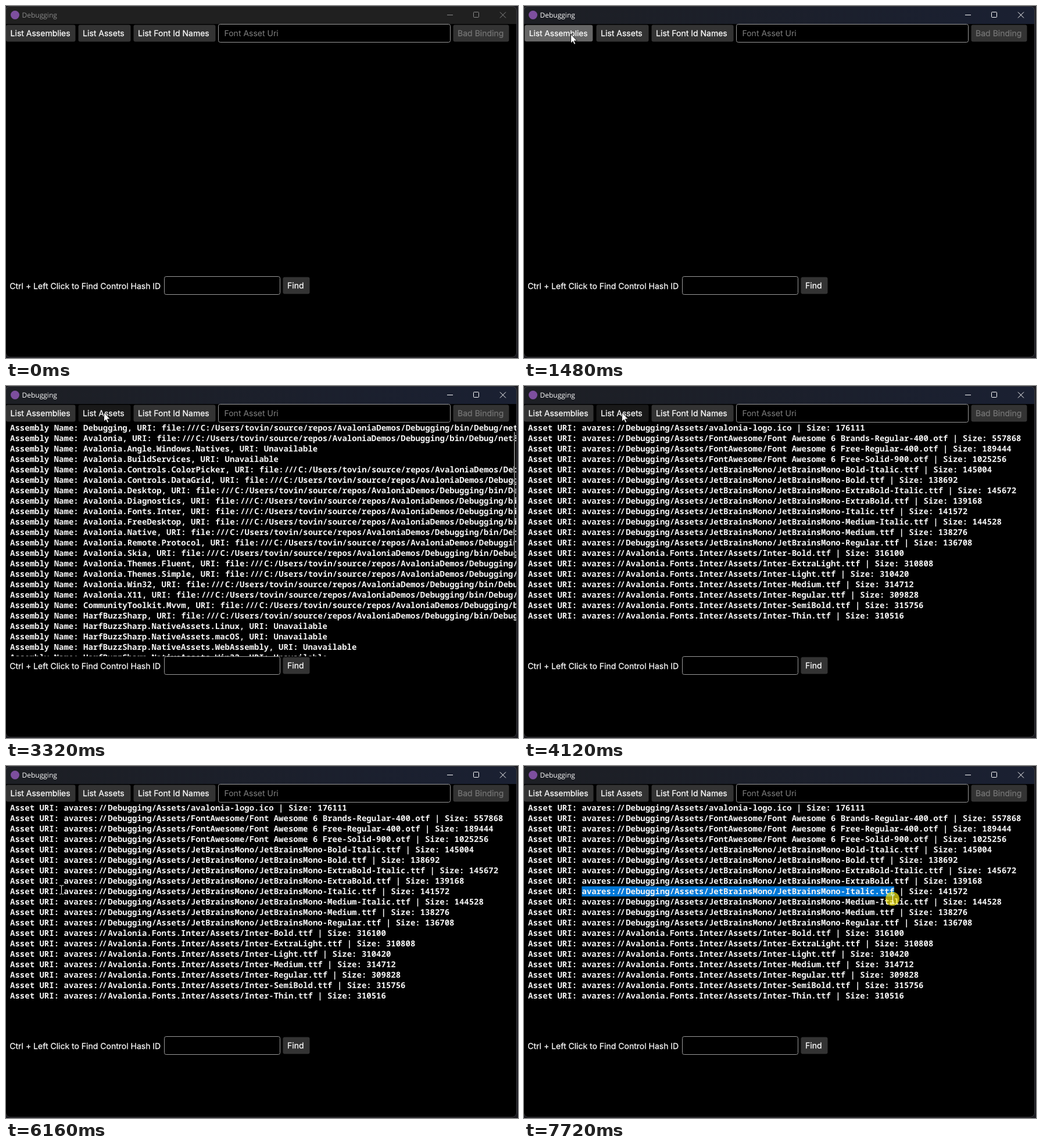
An HTML page that plays this animation: 881x607 px, repeating every 8 s.

```html
<!DOCTYPE html>
<html lang="en">
<head>
<meta charset="utf-8">
<title>Debugging</title>
<style>
  html, body { margin: 0; width: 100%; height: 100%; overflow: hidden; background: #1c1c22; }
  svg { display: block; width: 881px; height: 607px; }
  text { text-rendering: geometricPrecision; }
  .ui { font: 400 14px Inter, sans-serif; fill: #fff; stroke: #fff; stroke-width: .25px; }
  .dim { fill: #747474; stroke: #747474; }
  .hint { fill: #808080; stroke: none; }
  .title { font: 400 12px "Open Sans", "Noto Sans", sans-serif; }
  .mono { font: 600 14px "Noto Sans Mono", "DejaVu Sans Mono", monospace; fill: #f4f4f4; }
  .box { fill: #000; stroke: #9a9a9a; }
</style>
</head>
<body>
<svg id="stage" viewBox="0 0 881 607" xmlns="http://www.w3.org/2000/svg"></svg>
<script>
const LOOP = 8000;
const NS = "http://www.w3.org/2000/svg";
const COL = 8.4, LEFT = 7, ROW = 18, BASE = 77;
const stage = document.getElementById("stage");

function el(tag, attrs, parent = stage, text) {
  const node = document.createElementNS(NS, tag);
  for (const key in attrs) node.setAttribute(key, attrs[key]);
  if (text !== undefined) node.textContent = text;
  parent.appendChild(node);
  return node;
}
const show = (node, on) => node.setAttribute("visibility", on ? "visible" : "hidden");
const clamp = v => Math.max(0, Math.min(1, v));
const smooth = p => p * p * (3 - 2 * p);
const mix = (a, b, p) => "rgb(" + a.map((v, i) => Math.round(v + (b[i] - v) * p)) + ")";

// Pulls runs of slashes together, as a coding ligature does.
function ligature(text) {
  const dx = [];
  const run = text.match(/\/\/+/);
  if (!run) return "0";
  const first = run.index, n = run[0].length;
  for (let i = 0; i <= first + n; i++) dx[i] = 0;
  dx[first] = 1.2;
  for (let i = 1; i < n; i++) dx[first + i] = -2.4 / (n - 1);
  dx[first + n] = 1.2;
  return dx.join(" ");
}

// Window frame
const defs = el("defs", {});
const grad = el("linearGradient", { id: "bar" }, defs);
const stops = [0, 1].map(offset => el("stop", { offset }, grad));
const winClip = el("clipPath", { id: "win" }, defs);
el("rect", { x: -1, y: 0, width: 880, height: 606, rx: 8 }, winClip);
const listClip = el("clipPath", { id: "list" }, defs);
el("rect", { x: 0, y: 63, width: 878, height: 403 }, listClip);

el("rect", { width: 881, height: 607, fill: "#1c1c22" });
const frame = el("g", { "clip-path": "url(#win)" });
el("rect", { width: 881, height: 607, fill: "#000" }, frame);
el("rect", { width: 881, height: 31, fill: "url(#bar)" }, frame);
el("rect", { x: -.5, y: .5, width: 879, height: 605, rx: 7.5, fill: "none", stroke: "#3d3d40" });

el("circle", { cx: 15.5, cy: 15.5, r: 7.5, fill: "#7d4f9e" });
const title = el("text", { class: "title", x: 27.5, y: 20 }, stage, "Debugging");
const caption = el("path", {
  d: "M759 15.5H769M805.5 10.5H812.5a1 1 0 0 1 1 1V18.5a1 1 0 0 1-1 1H805.5a-1-1 0 0 1-1-1V11.5a1 1 0 0 1 1-1ZM850 10.5l10 10M860 10.5l-10 10",
  fill: "none"
});

// Text lists
function makeList(lines) {
  const g = el("g", { "clip-path": "url(#list)" });
  lines.forEach((line, i) =>
    el("text", { class: "mono", x: LEFT, y: BASE + ROW * i, dx: ligature(line) }, g, line));
  return g;
}

const BIN = "file:///C:/Users/tovin/source/repos/AvaloniaDemos/Debugging/bin/Debug/net8.0/";
const assemblies = [
  "Debugging", "Avalonia", "-Avalonia.Angle.Windows.Natives", "-Avalonia.BuildServices",
  ..."Controls.ColorPicker Controls.DataGrid Desktop Diagnostics Fonts.Inter FreeDesktop Native Remote.Protocol Skia Themes.Fluent Themes.Simple Win32 X11"
    .split(" ").map(n => "Avalonia." + n),
  "CommunityToolkit.Mvvm", "HarfBuzzSharp",
  ...["Linux", "macOS", "WebAssembly", "Win32"].map(n => "-HarfBuzzSharp.NativeAssets." + n)
].map(n => {
  const name = n.replace(/^-/, "");
  return `Assembly Name: ${name}, URI: ${n === name ? BIN + name + ".dll" : "Unavailable"}`;
});

const asset = (dir, ext) => ([name, size]) =>
  `Asset URI: avares://${dir}${name}.${ext} | Size: ${size}`;
const assets = [
  asset("Debugging/Assets/", "ico")(["avalonia-logo", 176111]),
  ...[["Brands-Regular-400", 557868], ["Free-Regular-400", 189444], ["Free-Solid-900", 1025256]]
    .map(asset("Debugging/Assets/FontAwesome/Font Awesome 6 ", "otf")),
  ...[["Bold-Italic", 145004], ["Bold", 138692], ["ExtraBold-Italic", 145672], ["ExtraBold", 139168],
    ["Italic", 141572], ["Medium-Italic", 144528], ["Medium", 138276], ["Regular", 136708]]
    .map(asset("Debugging/Assets/JetBrainsMono/JetBrainsMono-", "ttf")),
  ...[["Bold", 316100], ["ExtraLight", 310808], ["Light", 310420], ["Medium", 314712],
    ["Regular", 309828], ["SemiBold", 315756], ["Thin", 310516]]
    .map(asset("Avalonia.Fonts.Inter/Assets/Inter-", "ttf"))
];

const selection = el("rect", { x: LEFT + 11 * COL, y: 207.5, height: 17.5, fill: "#0078d7" });
const assemblyList = makeList(assemblies);
el("rect", { x: 874, y: 79, width: 2, height: 218, rx: 1, fill: "#777" }, assemblyList);
const assetList = makeList(assets);

// Controls
function button(x, y, w, label, cls = "") {
  const g = el("g", {});
  const back = el("rect", { x, y, width: w, height: 29, rx: 3, fill: "#333" }, g);
  el("text", { class: "ui " + cls, x: x + 7.6, y: y + 19.3 }, g, label);
  return { g, back, x, y, w };
}
function textBox(x, y, w) {
  el("rect", { class: "box", x: x + .5, y: y + .5, width: w - 1, height: 31, rx: 3 });
}

const listAssemblies = button(0, 32.5, 119.5, "List Assemblies");
const listAssets = button(124.5, 32.5, 90, "List Assets");
button(219.5, 32.5, 141, "List Font Id Names");
textBox(365, 31, 400);
el("text", { class: "ui hint", x: 375.5, y: 52 }, stage, "Font Asset Uri");
button(769.5, 32.5, 96, "Bad Binding", "dim");
el("text", { class: "ui", x: 6.3, y: 488 }, stage, "Ctrl + Left Click to Find Control Hash ID");
textBox(272, 466, 200);
button(476.5, 467.5, 46, "Find");

// Pointer
const glow = el("circle", { r: 12, fill: "#fff014" });
const arrow = el("path", {
  d: "M.5 .5V16.2L4 12.9 6.3 18.2 8.7 17.2 6.4 12H11.3Z",
  fill: "#fff", stroke: "#000", "stroke-width": .9
});
const beam = el("path", {
  d: "M-3.5 -7.5H-1L0 -6.5 1 -7.5H3.5M0 -6.5V6.5M-3.5 7.5H-1L0 6.5 1 7.5H3.5",
  fill: "none", stroke: "#fff"
});

// Each move is sampled in a number of even steps.
const moves = [
  { from: 400, to: 880, steps: 7, pts: [[60, -14], [75, 36], [80, 48]] },
  { from: 2720, to: 3320, steps: 9, pts: [[80, 48], [168, 45]] },
  { from: 5320, to: 6080, steps: 11, pts: [[168, 45], [125, 130], [92, 212]] },
  { from: 6160, to: 6560, steps: 6, pts: [[95, 213], [95, 216], [98, 214]] },
  { from: 6960, to: 7720, steps: 11, pts: [[98, 214], [634, 229]] }
];
const clicks = [[1160, 1480], [3720, 3960], [6720, LOOP]];

function stepped(t, from, to, steps) {
  const k = Math.floor((t - from) / (to - from) * (steps - 1) + 1e-6);
  return clamp((k + 1) / steps);
}

function pointer(t) {
  const move = moves.filter(m => t >= m.from).pop();
  if (!move) return null;
  const { pts } = move;
  const u = smooth(stepped(t, move.from, move.to, move.steps)) * (pts.length - 1);
  const i = Math.min(pts.length - 2, Math.floor(u));
  return pts[i].map((v, a) => v + (pts[i + 1][a] - v) * (u - i));
}

function paintButton(b, pos, t, down, up) {
  const pressed = t >= down && t < up;
  const over = pos && pos[0] >= b.x && pos[0] < b.x + b.w && pos[1] >= b.y && pos[1] < b.y + 29;
  const s = pressed ? 1 - .02 * clamp((t - down + 40) / 80) : 1;
  const cx = b.x + b.w / 2, cy = b.y + 14.5;
  b.back.setAttribute("fill", pressed ? "#666" : over ? "#191919" : "#333");
  b.g.setAttribute("transform", `translate(${cx} ${cy}) scale(${s}) translate(${-cx} ${-cy})`);
}

function draw(t) {
  const active = t < 1160 ? 0 : stepped(t, 1160, 1480, 5);
  const ink = mix([138, 138, 138], [255, 255, 255], active);
  stops[0].setAttribute("stop-color", mix([32, 32, 32], [29, 31, 36], active));
  stops[1].setAttribute("stop-color", mix([32, 32, 32], [26, 32, 50], active));
  title.setAttribute("fill", ink);
  caption.setAttribute("stroke", ink);

  const pos = pointer(t);
  paintButton(listAssemblies, pos, t, 1160, 1720);
  paintButton(listAssets, pos, t, 3720, 4120);
  show(assemblyList, t >= 1720 && t < 4120);
  show(assetList, t >= 4120);

  const inText = pos && pos[1] > 63;
  show(arrow, pos && !inText);
  show(beam, inText);
  const click = clicks.find(([a, b]) => t >= a && t < b);
  show(glow, click);
  if (pos) {
    const at = `translate(${Math.round(pos[0])} ${Math.round(pos[1])})`;
    arrow.setAttribute("transform", at);
    beam.setAttribute("transform", `${at} translate(.5 .5)`);
    glow.setAttribute("transform", at);
  }
  if (click) glow.setAttribute("opacity", t - click[0] < 80 ? .4 : .67);

  const cols = t >= 6960 ? Math.round((pos[0] - LEFT) / COL) - 11 : 0;
  selection.setAttribute("width", Math.max(0, cols * COL));
}

const start = performance.now();
function tick() {
  draw((performance.now() - start) % LOOP);
  requestAnimationFrame(tick);
}
tick();
</script>
</body>
</html>
```
